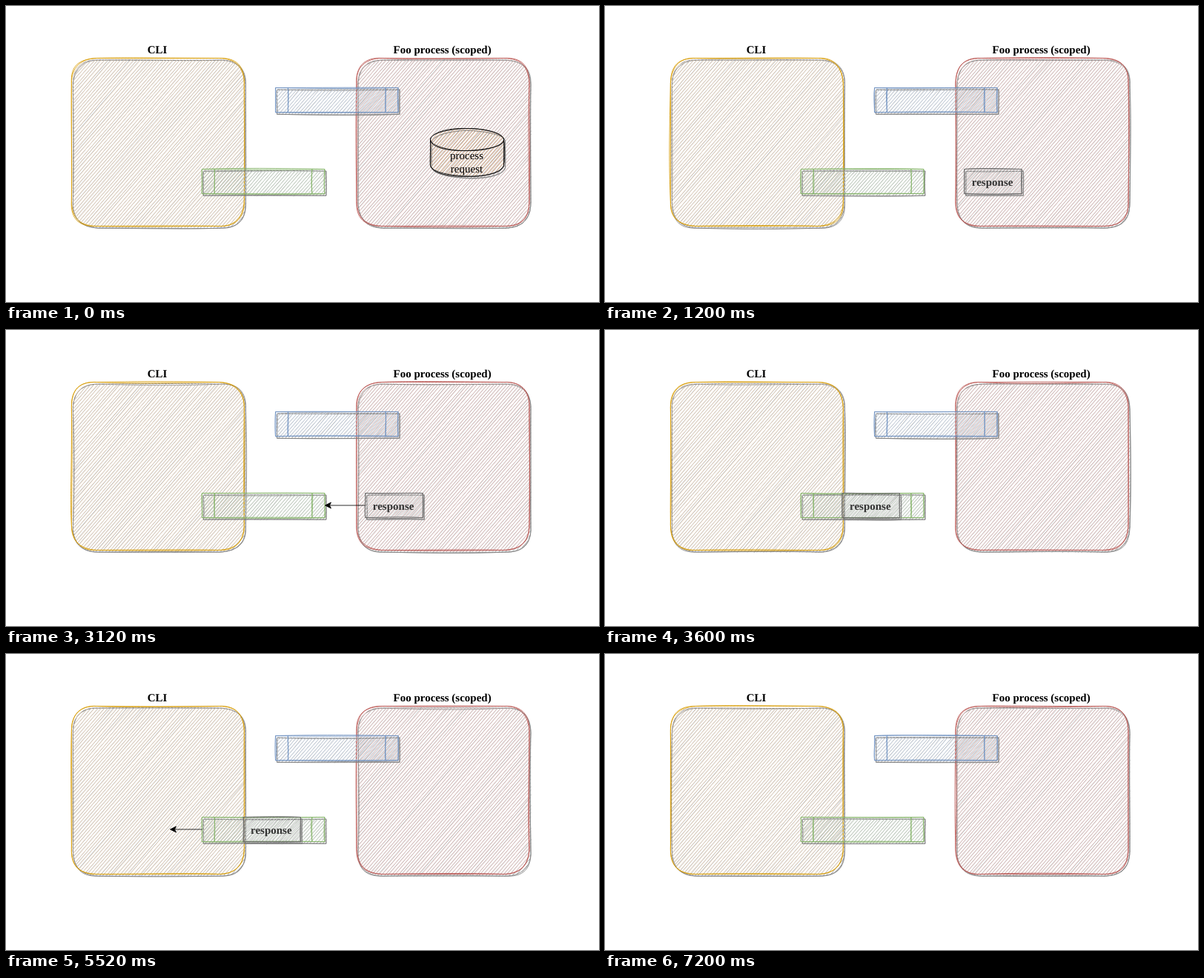
An HTML page that plays this animation: 800 px wide and 400 px high, repeating every 8 s.

```html
<!DOCTYPE html>
<html lang="en">
<head>
<meta charset="utf-8">
<title>Scoped process response</title>
<style>
  html, body { margin: 0; width: 100%; height: 100%; overflow: hidden; background: #fff; }
  svg { display: block; }
  path { fill: none; }
  text {
    font: 15px "Liberation Serif", "Times New Roman", serif;
    text-anchor: middle;
    text-rendering: geometricPrecision;
  }
  .bold { font-weight: bold; }
</style>
</head>
<body>
<svg id="stage" width="800" height="400" viewBox="0 0 800 400"></svg>
<script>
const STEP = 1200, LOOP = 8000, STEPS = 7;
const SCALE = 5 / 6, GAP = 4 * SCALE, ANGLE = 49 * Math.PI / 180;
const SHADOW = { dx: 2, dy: 2.6, color: '#808080' };
const COS = Math.cos(ANGLE), SIN = Math.sin(ANGLE);

const stage = document.getElementById('stage');
let layer, seed;

function rand() {
  seed = (seed + 0x6D2B79F5) | 0;
  let t = Math.imul(seed ^ (seed >>> 15), 1 | seed);
  t = (t + Math.imul(t ^ (t >>> 7), 61 | t)) ^ t;
  return ((t ^ (t >>> 14)) >>> 0) / 4294967296;
}
const jitter = r => (rand() * 2 - 1) * r;
const fix = list => list.map(v => v.toFixed(2)).join(' ');

function add(tag, attrs, text) {
  const el = document.createElementNS('http://www.w3.org/2000/svg', tag);
  for (const key in attrs) el.setAttribute(key, attrs[key]);
  if (text) el.textContent = text;
  layer.appendChild(el);
  return el;
}

// One hand-drawn stroke: a bowed Bezier. Loose strokes bow less but miss their ends.
function stroke(x1, y1, x2, y2, scale, loose) {
  const dx = x2 - x1, dy = y2 - y1, len = Math.hypot(dx, dy);
  const gain = Math.min(1, 1.233334 - 0.0016668 * len) * SCALE * (loose ? 0.45 : 1);
  const r = Math.min(2, len / 10) * scale * gain;
  const split = 0.2 + rand() * 0.2;
  const bowX = jitter(dy / 100 * gain), bowY = jitter(-dx / 100 * gain);
  const end = loose ? 2 * r : 0;
  return 'M' + fix([x1 + jitter(end) * COS, y1 - jitter(end) * SIN]) + 'C' + fix([
    bowX + x1 + dx * split + jitter(r), bowY + y1 + dy * split + jitter(r),
    bowX + x1 + 2 * dx * split + jitter(r), bowY + y1 + 2 * dy * split + jitter(r),
    x2 + jitter(end) * COS, y2 - jitter(end) * SIN]);
}
const line = (a, b, loose) =>
  stroke(...a, ...b, 1, loose) + stroke(...a, ...b, 0.5, loose);

const curve = (a, b, c, d) => [2, 2.3].map(r =>
  'M' + fix(a) + 'C' + fix([...b, ...c].map(v => v + jitter(r * SCALE))) + ' ' + fix(d)).join('');

// A shape is a list of segments: two points for a line, four for a curve.
const outline = shape => shape.map(s => s.length === 2 ? line(...s) : curve(...s)).join('');

function flatten(shape) {
  const points = [];
  for (const s of shape) {
    if (s.length === 2) { points.push(s[0]); continue; }
    for (let i = 0; i < 10; i++) {
      const t = i / 10, u = 1 - t;
      points.push([0, 1].map(k => u * u * u * s[0][k] + 3 * u * u * t * s[1][k] +
        3 * u * t * t * s[2][k] + t * t * t * s[3][k]));
    }
  }
  return points;
}

// Hachure for a convex shape, scanned in rotated space.
function hatch(shape) {
  const pts = flatten(shape).map(([x, y]) => [x * COS - y * SIN, x * SIN + y * COS]);
  const ys = pts.map(p => p[1]), bottom = Math.max(...ys);
  const back = (x, y) => [x * COS + y * SIN, y * COS - x * SIN];
  let d = '';
  for (let y = Math.min(...ys) + 0.01; y < bottom; y += GAP) {
    const xs = [];
    pts.forEach((p, i) => {
      const q = pts[(i + 1) % pts.length];
      if ((p[1] <= y) !== (q[1] <= y)) xs.push(p[0] + (q[0] - p[0]) * (y - p[1]) / (q[1] - p[1]));
    });
    if (xs.length > 1) d += line(back(Math.min(...xs), y), back(Math.max(...xs), y), true);
  }
  return d;
}

function sketch(shape, fill, color) {
  const paint = (fillColor, strokeColor, attrs) => {
    add('path', { d: hatch(shape), stroke: fillColor, 'stroke-width': SCALE / 2, ...attrs });
    add('path', { d: outline(shape), stroke: strokeColor, 'stroke-width': SCALE, ...attrs });
  };
  paint(SHADOW.color, SHADOW.color, { transform: `translate(${SHADOW.dx} ${SHADOW.dy})` });
  paint(fill, color);
}
const pen = (d, color) => add('path', { d, stroke: color, 'stroke-width': SCALE });

function rect(x, y, w, h) {
  const p = [[x, y], [x + w, y], [x + w, y + h], [x, y + h]];
  return p.map((a, i) => [a, p[(i + 1) % 4]]);
}

function roundRect(x, y, w, h, r) {
  return rect(x, y, w, h).flatMap(([a, b], i, sides) => {
    const c = sides[(i + 1) % 4][1];
    const toward = (p, q, n) => {
      const len = Math.hypot(q[0] - p[0], q[1] - p[1]);
      return [p[0] + (q[0] - p[0]) * n / len, p[1] + (q[1] - p[1]) * n / len];
    };
    const start = toward(b, a, r), end = toward(b, c, r);
    return [[toward(a, b, r), start],
      [start, toward(b, a, r / 3), toward(b, c, r / 3), end]];
  });
}

// Half ellipse from (x - rx * dir, y) to (x + rx * dir, y), bulging by ry.
function arc(x, y, rx, ry, dir) {
  const k = 0.5523, l = x - rx * dir, r = x + rx * dir, top = y + ry;
  return [
    [[l, y], [l, y + ry * k], [x - rx * k * dir, top], [x, top]],
    [[x, top], [x + rx * k * dir, top], [r, y + ry * k], [r, y]]];
}

const label = (x, y, text, cls = '', fill = '#000') => add('text', { x, y, class: cls, fill }, text);

function panel(x, fill, color, title) {
  sketch(roundRect(x, 70.5, 233, 227, 34), fill, color);
  label(x + 115.6, 64, title, 'bold');
}

function pipe(x, y, fill, color) {
  sketch(rect(x, y, 165.5, 33.2), fill, color);
  for (const dx of [16.8, 148.5]) pen(line([x + dx, y], [x + dx, y + 33.2]), color);
}

function cylinder() {
  const x = 622, rx = 49.5, top = 180.5, low = 215.2, ry = 15;
  sketch([...arc(x, top, rx, -ry, 1), [[x + rx, top], [x + rx, low]],
    ...arc(x, low, rx, ry, -1), [[x - rx, low], [x - rx, top]]], '#ffcc99', '#000');
  pen(outline(arc(x, top, rx, ry, -1)), '#000');
  label(621.5, 207, 'process');
  label(621.5, 225, 'request');
}

function response(x) {
  sketch(rect(x, 220.5, 77.5, 33.2), '#f5f5f5', '#666');
  label(x + 37.8, 243, 'response', 'bold', '#333');
}

function arrow(from, tip) {
  pen(`M${from} 237H${tip + 6}`, '#000');
  add('path', { d: `M${tip} 237l8-4-2 4 2 4z`, style: 'fill:#000', stroke: '#000', 'stroke-width': SCALE });
}

const scenes = [
  cylinder,
  () => response(484.8),
  () => { response(484.8); arrow(484.5, 430.5); },
  () => response(320),
  () => { response(320); arrow(264.5, 221.5); },
  () => response(143.8),
  () => {}
];

const layers = scenes.map((scene, i) => {
  layer = document.createElementNS('http://www.w3.org/2000/svg', 'g');
  seed = 1000 + i * 77;
  panel(88.4, '#ffe6cc', '#d79b00', 'CLI');
  panel(473, '#f8cecc', '#b85450', 'Foo process (scoped)');
  pipe(363.6, 110.5, '#dae8fc', '#6c8ebf');
  pipe(264.4, 220.5, '#d5e8d4', '#82b366');
  scene();
  return stage.appendChild(layer);
});

function tick() {
  const now = Math.min(STEPS - 1, Math.floor(performance.now() % LOOP / STEP));
  layers.forEach((g, i) => { g.style.display = i === now ? '' : 'none'; });
  requestAnimationFrame(tick);
}
tick();
</script>
</body>
</html>
```
